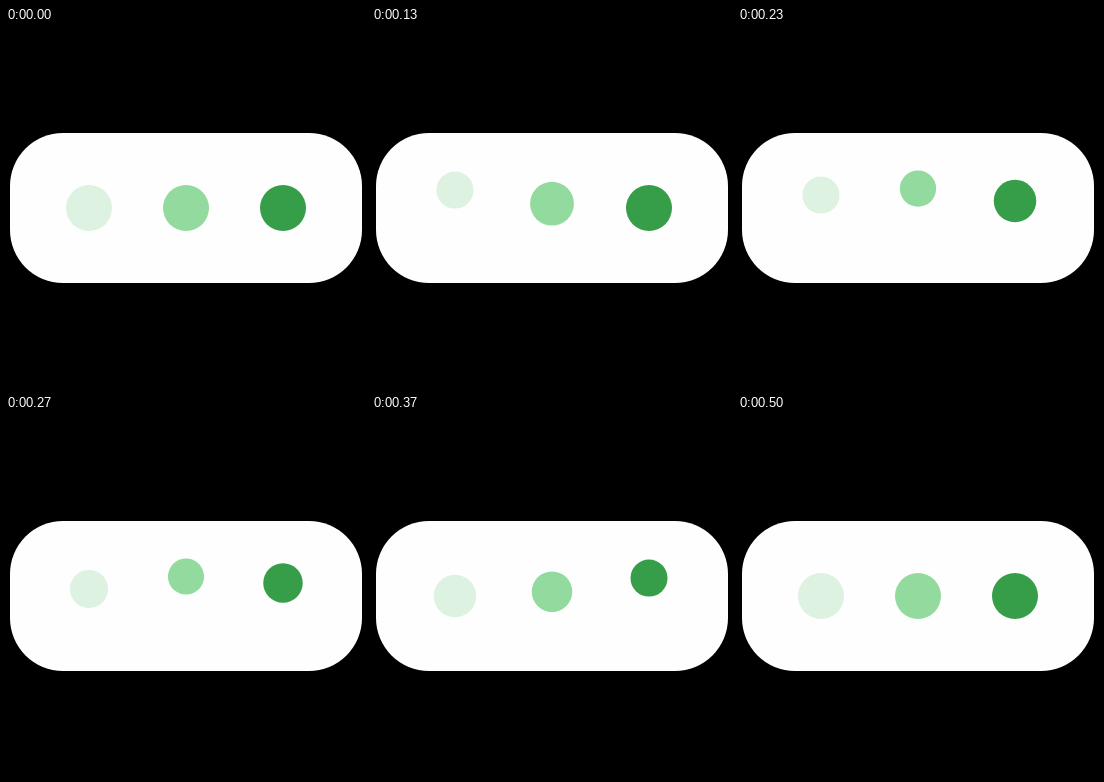
Write an HTML page that moves like this. It is 360 px wide and 360 px high and loops after 0.53 s.

```html
<!DOCTYPE html>
<html lang="en">
<head>
<meta charset="utf-8">
<title>Typing dots</title>
<style>
  html, body { margin: 0; width: 100%; height: 100%; overflow: hidden; background: #000; }
  svg { display: block; width: 100vw; height: 100vh; }
</style>
</head>
<body>
<svg viewBox="0 0 360 360">
  <rect x="4" y="105" width="352" height="150" rx="53" fill="#fdfefd"/>
  <circle class="dot" cx="83" cy="180" r="23" fill="#ddf2e0"/>
  <circle class="dot" cx="180" cy="180" r="23" fill="#93da9e"/>
  <circle class="dot" cx="277" cy="180" r="23" fill="#369e48"/>
</svg>
<script>
  const LOOP = 530;   // ms
  const RISE = 5;     // ticks up, and ticks down again
  const STAGGER = 2.5;
  const LAST = 15;    // all dots are back to full size here
  const dots = document.querySelectorAll('.dot');

  // Eased progress of tick n between ticks a and b
  const ease = (n, a, b) => {
    const p = Math.min(1, Math.max(0, (n - a) / (b - a)));
    return p * p * (3 - 2 * p);
  };

  // 30 ticks per second, held for 30, 40 and 30 ms in turn
  const tickAt = ms => {
    const rest = ms % 100;
    return 3 * Math.floor(ms / 100) + (rest >= 30) + (rest >= 70);
  };

  function draw(ms) {
    const n = tickAt(ms % LOOP);
    dots.forEach((dot, i) => {
      const start = i * STAGGER, peak = start + RISE;
      const up = ease(n, start, peak);
      const lift = up - ease(n, peak, peak + RISE);
      const shrink = up - ease(n, peak, LAST);
      dot.setAttribute('cy', 180 - 20 * lift);
      dot.setAttribute('r', 23 - 5 * shrink);
    });
  }

  const t0 = performance.now();
  (function loop() {
    draw(performance.now() - t0);
    requestAnimationFrame(loop);
  })();
</script>
</body>
</html>
```
